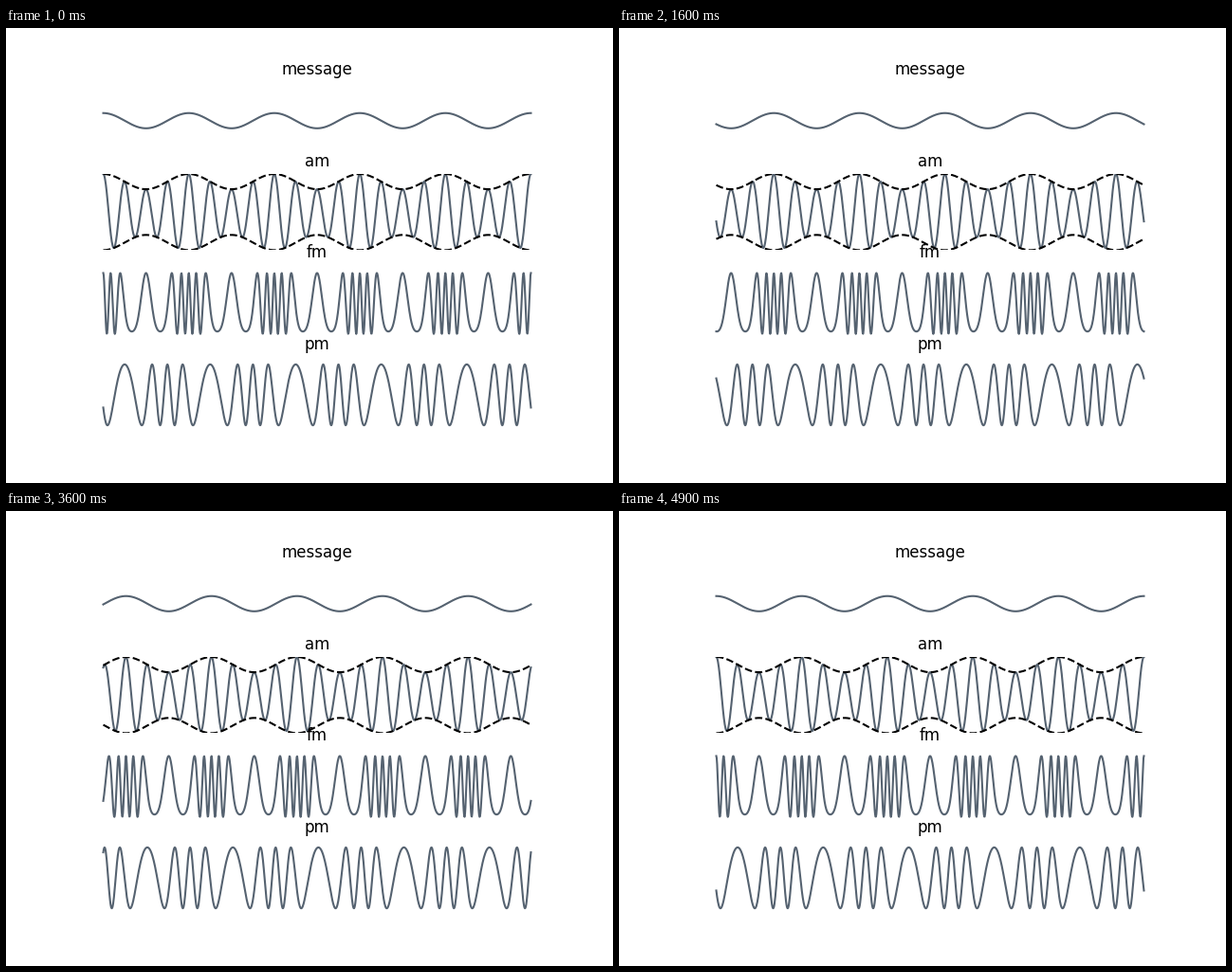
Recreate the animation shown at these times as a matplotlib script. Size 640 by 480 pixels, loop 5000 ms.

```python
import matplotlib.pyplot as plt
import numpy as np
from matplotlib.animation import FuncAnimation

FRAMES = 50
PERIODS = 5
CARRIER = 4      # carrier cycles per message cycle
DEPTH = 0.25     # message amplitude
FM_INDEX = 8
PM_INDEX = 2
SLATE = "#556270"

t = np.linspace(0, 2 * np.pi * PERIODS, 1000)


def signals(frame):
    """Message, AM, FM, PM, then the upper and lower AM envelope."""
    u = t + 2 * np.pi * frame / (FRAMES - 1)
    message = DEPTH * np.cos(u)
    envelope = 1 + message
    return (
        message,
        envelope * np.cos(CARRIER * u),
        np.cos(CARRIER * u + FM_INDEX * np.sin(u)),
        np.cos(CARRIER * u + PM_INDEX * np.cos(u)),
        envelope,
        -envelope,
    )


fig, axes = plt.subplots(4, 1, figsize=(6.4, 4.8), dpi=100)
fig.subplots_adjust(left=0.125, right=0.9, bottom=0.11, top=0.88, hspace=0.2)

start = signals(0)
lines = []
for ax, title, y in zip(axes, ("message", "am", "fm", "pm"), start):
    lines += ax.plot(t, y, color=SLATE, lw=1.5)
    ax.set_title(title, fontsize=12)
    ax.set_ylim(-1 - DEPTH, 1 + DEPTH)
    ax.axis("off")
for y in start[4:]:
    lines += axes[1].plot(t, y, "k--", lw=1.5)


def update(frame):
    for line, y in zip(lines, signals(frame)):
        line.set_ydata(y)
    return lines


anim = FuncAnimation(fig, update, frames=FRAMES, interval=100, repeat=True)
plt.show()
```
